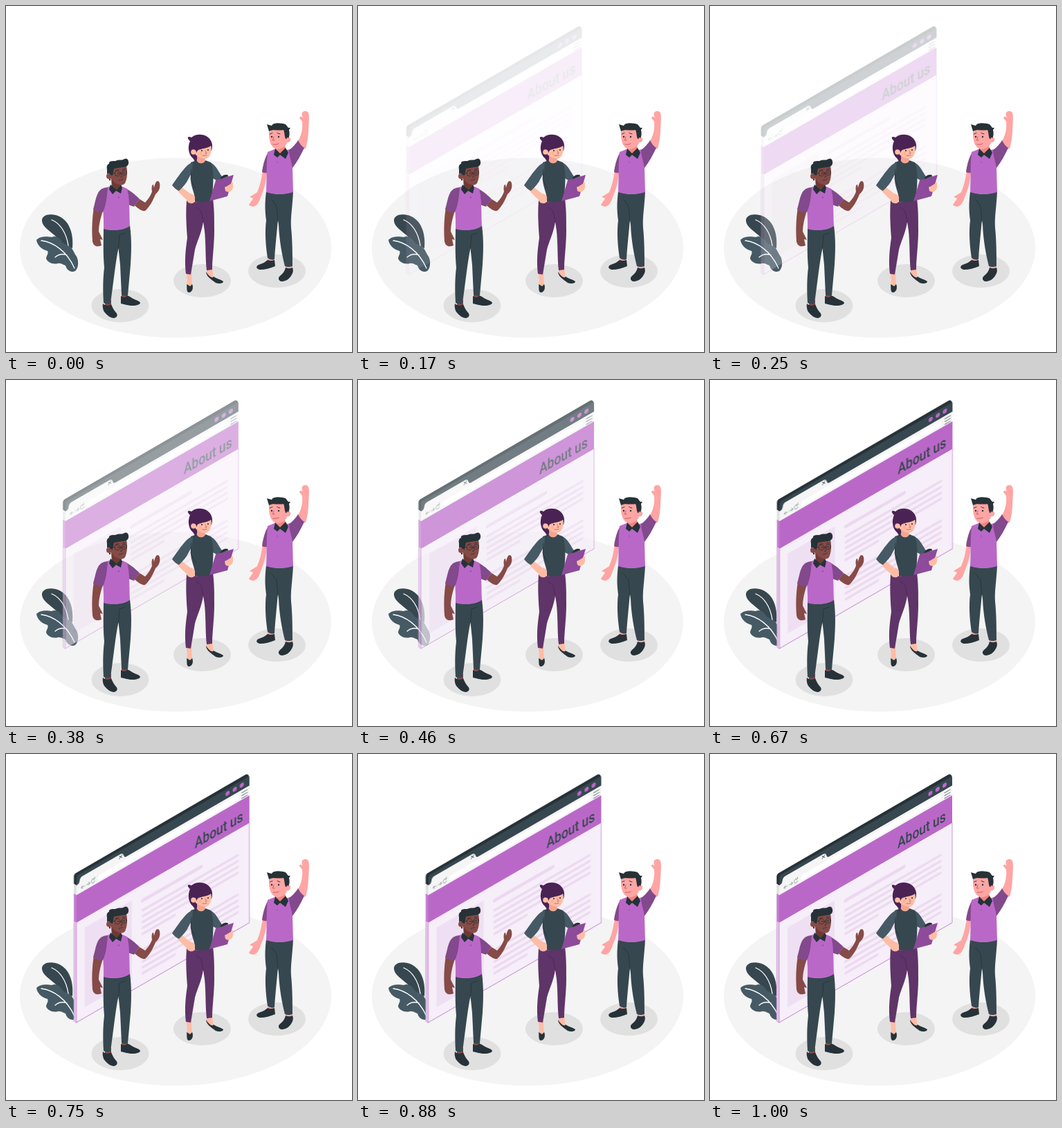
An HTML page that plays this animation: 500 by 500 pixels, repeating every 1040 ms.

```html
<!DOCTYPE html>
<html lang="en">
<head>
<meta charset="utf-8">
<title>About us</title>
<style>
  html, body { margin: 0; width: 100%; height: 100%; overflow: hidden; background: #fff; }
  svg { display: block; width: 100vw; height: 100vh; }

  .window { animation: enter 1040ms infinite; }
  @keyframes enter {
    0% {
      opacity: 0;
      transform: translateX(-30px);
      animation-timing-function: cubic-bezier(.36, -.01, .5, 1.38);
    }
    92.5%, 100% { opacity: 1; transform: none; }
  }

  .ink { fill: #263238; }
  .slate { fill: #37474f; }
  .steel { fill: #455a64; }
  .violet { fill: #ba68c8; }
  .plum { fill: #82498c; }
  .aubergine { fill: #4a2354; }
  .brown { fill: #864b46; }
  .peach { fill: #ffbca5; }
  .pink { fill: #ffa5a3; }
  .line { fill: none; stroke-linecap: round; stroke-linejoin: round; }
  .heading { font: 500 21.5px Roboto, "Liberation Sans", sans-serif; }
</style>
</head>
<body>
<svg viewBox="0 0 500 500">
  <ellipse cx="245" cy="349.5" rx="225" ry="130" fill="#f4f4f4"/>
  <g fill="#e0e0e0">
    <ellipse cx="165" cy="433" rx="41.5" ry="24"/>
    <ellipse cx="283.5" cy="397" rx="41.5" ry="24"/>
    <ellipse cx="391.5" cy="383" rx="41.5" ry="24"/>
  </g>

  <!-- plant -->
  <path class="slate" d="M52 311C51 301 66 299 77 304C92 311 98 330 96 350C86 348 78 340 72 333C65 326 53 320 52 311Z"/>
  <path class="steel" d="M44 338C50 332 60 333 66 334C72 331 77 335 80 339C83 345 88 344 91 346C98 352 98 357 102 362C106 370 104 380 100 383C94 386 88 382 86 375C80 372 77 371 75 372C67 374 60 370 58 365C58 361 62 358 60 354C52 352 45 346 44 338Z"/>
  <path class="line" stroke="#fff" stroke-width="1.3" d="M66 309C78 314 87 327 90 346M51 339C68 341 88 354 99 379M71 363C77 358 83 358 88 360"/>

  <g class="window">
    <!-- thickness -->
    <path class="ink" d="M96.3 177Q96.3 174 98.500 172.500L344 30Q347 28 349 31L350 34L100 190L96.300 187.400Z"/>
    <path fill="#e0e0e0" d="M96.300 187.400L100 190V204L96.300 201.400Z"/>
    <path fill="#c27bcf" d="M96.300 201.400L100 204V244L96.300 241.400Z"/>
    <path fill="#e2c4e8" d="M96.300 241.400L100 244V388.500L96.300 386Z"/>

    <!-- front face on the isometric plane -->
    <g transform="matrix(1 -.577 0 1 100 0)">
      <path class="slate" d="M0 190V180Q0 176 3 176H247Q250 176 250 179V190Z"/>
      <path fill="#f5f5f5" d="M0 190Q4 190 4.500 186.500Q5 181.500 9 181.500H64Q67 181.500 68 185Q69 190 72 190H250V204H0Z"/>
      <rect x="31" y="193.500" width="203" height="7.500" rx="3" fill="#fff"/>
      <rect class="violet" y="204" width="250" height="40"/>
      <rect y="244" width="250" height="144" fill="#f6eef8"/>
      <rect x="12" y="258" width="68" height="115" fill="#eee0f2"/>
      <path class="line" stroke="#ecd7f0" stroke-width="5" d="M96 267H180"/>
      <path class="line" stroke="#ecd9f0" stroke-width="3.600"
        d="M96 281H233M96 289.500H233M96 298H233M96 306.500H233M96 315H142M96 338H233M96 346.500H233M96 355H233M96 363.500H233M96 372H142"/>
      <g class="violet">
        <circle cx="218.500" cy="183" r="3.100"/>
        <circle cx="228.800" cy="183" r="3.100"/>
        <circle cx="239" cy="183" r="3.100"/>
      </g>
      <g class="line" stroke="#37474f" stroke-width=".8">
        <path d="M62 183.500L66 187.500M66 183.500L62 187.500"/>
        <path stroke="#8b979c" stroke-width=".7" d="M12 197.500H7M9 195.500L7 197.500L9 199.500M14.500 197.500H19.500M17.500 195.500L19.500 197.500L17.500 199.500M26.500 198.500A2.600 3 0 1 1 26 195M26.500 193V195.500H24"/>
        <path stroke="#737f85" stroke-width="1.200" d="M239 194H247M239 198H247M239 202H247"/>
      </g>
      <text class="heading slate" transform="matrix(.81 0 0 1 171 235.300)">About us</text>
      <path class="line" stroke="#c47ed1" stroke-width=".8" d="M0 244V388H250V244"/>
    </g>
    <path class="line" stroke="#c99ad2" stroke-width=".7" d="M96.300 241V386L100 388.500"/>
  </g>

  <!-- man on the left -->
  <g>
    <path class="brown" d="M143 425H152V436H143ZM167 413H176V424H167Z"/>
    <path class="slate" d="M141 320C152 325 170 325 179 317C182 340 181 357 180 374L176 418Q171 420 167 417L165 374L162.500 350C160 362 158 376 156.500 388L151 430Q146 432 141 429C140 410 140 395 142 378C140 355 141 340 141 320Z"/>
    <path class="line" stroke="#263238" stroke-width=".8" d="M162.500 350L164 331L172 328"/>
    <path class="ink" d="M140 430C139 436 141 440 142 442C146 447 151 451 156 451C161 450 162 446 159 443C156 440 154 436 152 431C148 434 143 433 140 430ZM166 419V430C172 431 176 433 183 433C189 433 194 431 194 429C193 426 187 425 182 422C179 420 176 418 175 419C172 422 168 421 166 419Z"/>
    <path class="brown" d="M127 291L140 296C136 308 134 318 134 326L140 338L136 337L138 346C132 349 126 347 125 340C124 325 124 310 127 291Z"/>
    <path class="brown" d="M186 288L193 279L201 284C206 279 210 272 211 268C210 262 211 258 213 258L214 263C215 257 217 253 219 253C222 253 223 258 222 263C221 267 219 269 216 272C212 282 207 291 201 296C197 297 191 293 186 288Z"/>
    <path class="plum" d="M168 262C177 264 186 272 193 279L185 290L176 287Z"/>
    <path class="violet" d="M142 264L151 260L168 261L175 264C179 277 178 297 179 318C170 324 152 326 141 322C142 305 138 285 142 264Z"/>
    <path class="plum" d="M147 262C136 263 133 268 130 278L126 294Q133 299 140 298C145 288 146 274 147 262Z"/>
    <path fill="#6d3a35" d="M152 249L153 262C157 269 164 269 167 261L166 255Z"/>
    <path class="brown" d="M150 235L174 231C176 240 175 250 172 256C169 260 162 259 157 255L150 248Z"/>
    <circle class="brown" cx="149" cy="246" r="4"/>
    <circle cx="150" cy="251" r="1.200" class="ink"/>
    <path class="ink" d="M146 243L146 236C145 232 146 229 149 228C148 224 153 224 158 224C163 221 168 224 171 221C175 219 178 223 177 228C176 232 172 233 168 233L156 235L154 245L151 244Q149 240 146 243Z"/>
    <path class="ink" d="M151 258L149 265L154 272L159 267L166 271L168 262L166 259L160 266Z"/>
    <g class="line" stroke="#263238" stroke-width=".8">
      <circle cx="161" cy="242" r="3.800"/>
      <circle cx="171" cy="241" r="3.500"/>
      <path d="M165 241.500L167.500 241M157 241L151 243M158 237.500L163 236.500M168 236L173 235.500M166 242L168 247L165.500 247.500M163 252Q167 252 169 250M163 276V277"/>
    </g>
    <circle class="ink" cx="162" cy="242" r="1"/>
    <circle class="ink" cx="170.500" cy="241" r="1"/>
  </g>

  <!-- woman -->
  <g>
    <path class="peach" d="M261 385H268L269 406H262ZM290 379H298L300 393L297 395L290 388Z"/>
    <path fill="#5f3468" d="M261 281C272 285 290 283 299 278C301 295 301 305 301 325C301 345 298 365 298 381L290 382C288 365 289 345 287 325L285 312C282 330 276 340 273 352L267 388L260 387C258 370 259 355 262 335C260 310 260 295 261 281Z"/>
    <path class="line" stroke="#48264f" stroke-width=".8" d="M285 312L282 297L275 291"/>
    <path class="ink" d="M261 402C262 408 260 414 265 414C270 413 271 406 269 402L266 405ZM289 384C289 390 296 395 303 400C308 402 314 401 314 398C310 395 304 394 300 391C298 395 292 389 289 384Z"/>
    <path class="steel" d="M295 226C303 229 307 239 313 248L306 253L297 248Z"/>
    <path class="slate" d="M267 226L276 223C280 229 286 228 288 223L296 226C301 237 300 262 297 281Q286 285 273 283C274 270 266 262 267 246Z"/>
    <path class="peach" d="M245 263L253 261L266 271C270 271 274 275 273 279L272 284C266 287 262 284 261 280C255 275 250 270 245 263Z"/>
    <path class="steel" d="M270 226C261 228 252 242 240 259C243 263 247 266 250 267C256 261 261 256 264 249L269 240Z"/>
    <path class="line" stroke="#263238" stroke-width=".7" d="M268 236L267 250L273 263"/>
    <path fill="#f4a48f" d="M275 213L276 224C279 229 286 228 288 223L287 217Z"/>
    <path class="aubergine" d="M266 195C261 191 262 187 268 190C273 185 284 184 291 189C299 195 299 203 297 209L285 214L276 217Q277 223 273 227C273 223 271 221 269 219C264 214 262 204 266 195Z"/>
    <path class="peach" d="M274 206C281 206 290 204 296 200C298 208 296 217 291 220C286 222 279 219 274 215Z"/>
    <circle class="peach" cx="271" cy="211" r="3.800"/>
    <path class="aubergine" d="M271 207C275 207 274 211 276 212C275 205 289 208 297.500 201L288 190L272 196Z"/>
    <circle class="ink" cx="283" cy="209" r="1.100"/>
    <circle class="ink" cx="292" cy="208" r="1.100"/>
    <path class="line" stroke="#a65d61" stroke-width=".8" d="M288 209L290 213H288M284 216Q288 217 290 215.500"/>
    <circle cx="281" cy="213" r="2" fill="#ff9f91" opacity=".5"/>
    <path fill="#8e4a9b" d="M303 252L329 244L320 275L294 282Z"/>
    <path class="ink" d="M309 249.500L312 246Q316 243 320 244L321.500 246L311 250Z"/>
    <path class="peach" d="M316 262C320 260 324 258 328 254V263C326 269 320 270 317 267Z"/>
  </g>

  <!-- man on the right -->
  <g>
    <path class="pink" d="M378 361H388V371H378ZM404 373H414V383H404Z"/>
    <path class="slate" d="M376 268C388 273 402 273 415 268C414 290 411 305 412 320C414 340 414 360 414 376Q408 378 403 376C399 360 395 340 394 316L393 309C391 330 389 350 388 366Q383 368 378 364C375 345 374 325 376 310C374 295 374 285 376 268Z"/>
    <path class="line" stroke="#263238" stroke-width=".8" d="M393 311L391 289L384 280"/>
    <path class="ink" d="M378 367Q383 369 388 367L389 376C382 379 374 381 367 381C361 380 361 376 365 374C371 372 375 370 378 367ZM404 378C408 380 412 379 414 378C416 383 414 387 412 390C408 396 403 398 398 398C393 397 393 392 396 390C400 387 403 383 404 378Z"/>
    <path class="pink" d="M371 238L377 240C376 255 372 268 368 276C366 284 362 290 356 290L351 288C353 283 356 281 357 278L352 276C356 273 361 271 363 269C367 260 369 250 371 238Z"/>
    <path class="pink" d="M421 197C427 187 429 178 428 167L424 162C424 159 428 160 429 161C426 156 428 152 432 152C438 151 438 158 438 163C437 172 438 190 433 206C427 207 423 203 421 197Z"/>
    <path class="plum" d="M380 210C375 216 371 230 370 240Q374 242 378 241Z"/>
    <path class="violet" d="M378 211L388 207L405 208L412 207C415 214 416 223 414 232L415 269C402 273 388 273 376 269C377 250 376 230 378 211Z"/>
    <path class="plum" d="M409 208C414 205 419 199 422 194Q426 202 431 205C426 216 420 226 414 234C413 225 409 217 409 208Z"/>
    <path fill="#ef8580" d="M388 203L402 199L405 208L396 216L389 210Z"/>
    <path class="pink" d="M380 179L403 177L408 190C407 202 400 207 392 207C384 206 379 197 380 179Z"/>
    <circle class="pink" cx="407" cy="193" r="4.300"/>
    <path class="ink" d="M380 181L377 171L384 173C386 168 398 169 404 171L408 176L411 176L409 179C410 184 410 188 408 191C406 188 406 193 404 192C402 188 403 183 401 179C394 181 386 177 380 181Z"/>
    <path class="ink" d="M389 206L387 215L392 219L396 215L404 221L408 212L404 205L396 213Z"/>
    <g class="line" stroke="#263238" stroke-width=".9">
      <path d="M381.500 185L385 183.500M392 183.500L396 185"/>
      <path stroke="#b95961" d="M387 189L385.500 194H388M386 200Q390 201 394 199"/>
      <path stroke="#82498c" d="M392 225V226"/>
    </g>
    <circle class="ink" cx="384" cy="189" r="1.200"/>
    <circle class="ink" cx="394" cy="189" r="1.200"/>
  </g>
</svg>
</body>
</html>
```
